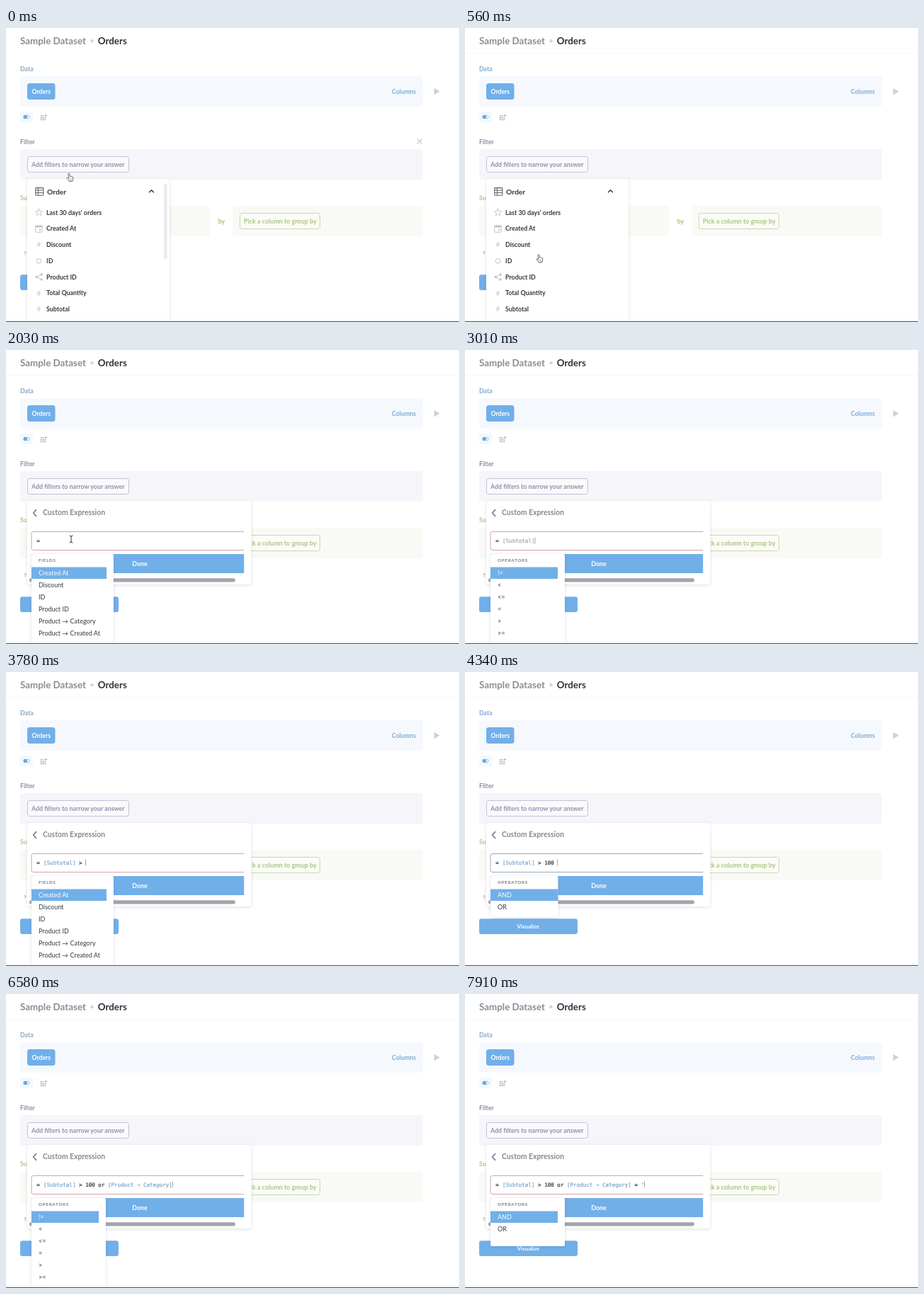
These frames come from a looping animation (640x415 px, 8000 ms). An HTML page:

```html
<!DOCTYPE html>
<html lang="en">
<head>
<meta charset="utf-8">
<title>Custom expression filter</title>
<style>
html, body { margin: 0; width: 100%; height: 100%; overflow: hidden; background: #fff; }
svg { display: block; width: 100vw; height: 100vh; }
text { font-family: Lato, "Open Sans", sans-serif; }
text.code { font-family: "DejaVu Sans Mono", "Noto Sans Mono", monospace; }
.shadow { filter: drop-shadow(0 1px 2px rgba(40, 50, 70, .16)); }
</style>
</head>
<body>
<svg id="stage" viewBox="0 0 640 415" xmlns="http://www.w3.org/2000/svg">
  <defs><clipPath id="menuClip"><rect x="30" y="213" width="201" height="201"/></clipPath></defs>
  <g id="page"></g>
  <g id="live"></g>
  <rect y="414" width="640" height="1" fill="#008700"/>
</svg>
<script>
const LOOP = 8000, STEP = 70;
const BLUE = '#71afe9', DARK = '#343a40', ICON = '#c0c3c9';
const CHAR = 4.55, CODE_X = 53;

// ---- drawing helpers ----
const esc = s => s.replace(/&/g, '&amp;').replace(/</g, '&lt;').replace(/>/g, '&gt;');
const rect = (x, y, w, h, fill, r = 0, extra = '') =>
  `<rect x="${x}" y="${y}" width="${w}" height="${h}" rx="${r}" fill="${fill}" ${extra}/>`;
const line = (d, color, w = 1, fill = 'none') =>
  `<path d="${d}" fill="${fill}" stroke="${color}" stroke-width="${w}" stroke-linecap="round" stroke-linejoin="round"/>`;
const label = (x, cy, size, fill, str, weight = 700, extra = '') =>
  `<text x="${x}" y="${cy + size * 0.35}" font-size="${size}" font-weight="${weight}" fill="${fill}" ${extra}>${str}</text>`;
const middle = 'text-anchor="middle"';
const dot = (x, y, r, fill) => `<circle cx="${x}" cy="${y}" r="${r}" fill="${fill}"/>`;
const clamp = v => Math.max(0, Math.min(1, v));
const ease = (t, a, b) => { const k = clamp((t - a) / (b - a)); return k * k * (3 - 2 * k); };
const mix = (a, b, k) => a + (b - a) * k;

function share(x, y, c) {
  return line(`M${x + 3.6} ${y - 3.5}L${x - 3.3} ${y}L${x + 3.6} ${y + 3.5}`, c, 1) +
    dot(x + 3.6, y - 3.5, 1.7, c) + dot(x - 3.3, y, 1.8, c) + dot(x + 3.6, y + 3.5, 1.7, c);
}

function drawPage() {
  let s = label(20, 18, 13.4, '#898e94', 'Sample Dataset') + dot(121.5, 18.3, 2.3, '#d3d6da') +
    label(129.8, 18, 13.35, '#2e353b', 'Orders');

  s += label(20, 57.5, 8.8, '#86a9cb', 'Data') + rect(20, 68, 569, 43, '#f5f9fe', 4) +
    rect(30, 78, 39.5, 23, BLUE, 3.5) + label(49.8, 89.5, 8.7, '#fff', 'Orders', 700, middle) +
    label(545, 89.5, 8.8, '#7dabd6', 'Columns') +
    '<path d="M604.8 85L613 89.6L604.8 94.4Z" fill="#cfd1d5"/>';

  s += rect(20, 118, 18, 15, '#f4f8fd', 3) +
    '<circle cx="30.6" cy="125.5" r="2.4" fill="none" stroke="#8fbde8" stroke-width=".9"/>' +
    dot(27.3, 125.5, 2.8, '#69a7e2');
  for (let i = 0; i < 9; i++)
    if (i !== 2) s += rect(48.8 + i % 3 * 2.8, 123.2 + Math.floor(i / 3) * 2.7, 1.8, 1.6, '#a3a7ae');
  s += line('M55 123.4h2.8M56.4 122v2.8', '#a3a7ae', 0.8);

  s += label(20, 160.5, 8.8, '#8d8fa2', 'Filter') + rect(20, 171, 569, 43, '#f6f5fa', 4) +
    rect(30.5, 181.5, 143, 22, '#faf9fc', 3, 'stroke="#c2c2d7"') +
    label(36, 193, 8.85, '#9192ab', 'Add filters to narrow your answer');

  s += label(20, 240, 8.8, '#b3c58e', 'Summarize') +
    rect(20, 251, 268, 43, '#f9faf5', 4) + rect(320, 251, 269, 43, '#f9faf5', 4) +
    label(304.5, 272.5, 8.8, '#abc482', 'by', 700, middle) +
    rect(330.5, 261.5, 113, 22, '#fbfcf8', 3, 'stroke="#c6d9ae"') +
    label(336, 272.5, 8.95, '#abc482', 'Pick a column to group by');

  s += line('M27.2 320v-4.6m-1.6 1.5l1.6-1.6l1.6 1.6', '#a8acb3', 0.8) +
    rect(20, 348.3, 139, 21.7, BLUE, 3) + label(89.2, 359, 8, '#fff', 'Visualize', 700, middle);
  return s;
}

// ---- column menu ----
const COLUMNS = [
  ['star', "Last 30 days' orders"], ['cal', 'Created At'], ['#', 'Discount'], ['id', 'ID'],
  ['share', 'Product ID'], ['#', 'Total Quantity'], ['#', 'Subtotal'], ['#', 'Tax'],
  ['#', 'Total'], ['share', 'User ID']
];

function star(x, y) {
  let d = '';
  for (let i = 0; i < 10; i++) {
    const r = i % 2 ? 2.3 : 5.2, a = Math.PI * (i / 5 - 0.5);
    d += `${i ? 'L' : 'M'}${(x + r * Math.cos(a)).toFixed(2)} ${(y + r * Math.sin(a)).toFixed(2)}`;
  }
  return line(d + 'Z', ICON, 0.9);
}

const icons = {
  star,
  cal: (x, y) => rect(x - 4.8, y - 4, 9.6, 9, 'none', 1, `stroke="${ICON}"`) +
    rect(x - 4.8, y - 4, 9.6, 2.2, ICON) + line(`M${x - 2.5} ${y - 5.4}v1.5m5-1.5v1.5`, ICON) +
    rect(x + 0.6, y + 1, 2.2, 2, ICON),
  '#': (x, y) => label(x, y, 9.5, ICON, '#', 400, middle),
  id: (x, y) => `<circle cx="${x}" cy="${y}" r="3.4" fill="none" stroke="${ICON}"/>`,
  share: (x, y) => share(x, y, ICON)
};

function drawMenu(t) {
  const scroll = 166.5 * ease(t, 650, 1200);
  let s = rect(41.8, 225.6, 11, 10.6, 'none', 0.6, 'stroke="#5c636a" stroke-width="1.1"') +
    line('M42 229h10.6M42 232.6h10.6M45.4 226v10', '#5c636a', 1) +
    label(58, 231, 10.3, DARK, 'Order') + line('M202.5 231.8l3-3l3 3', DARK, 1.5);
  COLUMNS.forEach(([icon, name], i) => {
    const y = 260.4 + i * 22.79;
    s += icons[icon](46.5, y) + label(57, y, 8.9, DARK, name);
  });
  [['Product', 498.2], ['User', 533]].forEach(([name, y]) => {
    s += share(47.3, y, DARK) + label(58, y, 10.35, DARK, name) +
      line(`M202.5 ${y - 1.5}l3 3l3-3`, DARK, 1.5);
  });
  s += line('M42.2 564.8h9.6M44.2 568h5.6M45.6 571.2h2.8', '#8083a0', 1.7) +
    label(57, 568, 10.3, '#8788a5', 'Custom Expression');

  const shown = t < 600 ? 0.22 * (1 - ease(t, 70, 420)) : ease(t, 600, 760);
  return `<g class="shadow">${rect(30, 213, 201, 214, '#fff', 4)}</g>
    <g clip-path="url(#menuClip)"><g transform="translate(0 ${-scroll})">${s}</g></g>` +
    rect(223.3, 219 + scroll * 0.53, 4.2, 107, '#989ca6', 2.1, `opacity="${shown}"`);
}

// ---- expression editor ----
const FIELDS = ['Created At', 'Discount', 'ID', 'Product ID', 'Product → Category', 'Product → Created At'];
const PRO = ['Product ID', 'Product → Category', 'Product → Created At', 'Product → Ean', 'Product → ID', 'Product → Price'];
const OPS = ['!=', '<', '<=', '=', '>', '>='];
const list = (title, rows, right, mark, bottom) => ({ title, rows, right, mark, bottom });
const lists = {
  fields: list('FIELDS', FIELDS, 152, 142, 426),
  pro: list('FIELDS', PRO, 153, 143, 426),
  sub: list('FIELDS', ['Subtotal'], 131.5, 131.5, 329),
  ops: list('OPERATORS', OPS, 141, 131, 426),
  logic: list('OPERATORS', ['AND', 'OR'], 131.5, 131.5, 346),
  or: list('OPERATORS', ['OR'], 131.5, 131.5, 329),
  logicWide: list('OPERATORS', ['AND', 'OR'], 141, 131, 356)
};

// time, text, list, last word still plain, matched letters, marked row
const SUB = '[Subtotal]', CAT = SUB + ' > 100 or [Product → Category]';
const STATES = [
  [1470, '', null],
  [1610, '', 'fields'],
  [2380, 's', 'fields', 1],
  [2520, 'su', 'sub', 1, 2],
  [2590, 'sub', 'sub', 1, 3],
  [3010, SUB, 'ops', 1],
  [3080, SUB, 'ops'],
  [3220, SUB + ' ', 'ops'],
  [3430, SUB + ' >', 'ops'],
  [3570, SUB + ' >', 'fields'],
  [3780, SUB + ' > ', 'fields'],
  [3920, SUB + ' > 1', null],
  [3990, SUB + ' > 10', null],
  [4060, SUB + ' > 100', null],
  [4200, SUB + ' > 100 ', 'logic'],
  [4690, SUB + ' > 100 o', 'or', 1, 1],
  [4830, SUB + ' > 100 or', 'or', 0, 2],
  [4970, SUB + ' > 100 or ', 'fields'],
  [5110, SUB + ' > 100 or p', 'pro', 1, 1],
  [5250, SUB + ' > 100 or pr', 'pro', 1, 2],
  [5390, SUB + ' > 100 or pro', 'pro', 1, 3],
  [6090, SUB + ' > 100 or pro', 'pro', 1, 3, 1],
  [6440, CAT, 'ops', 1],
  [6510, CAT, 'ops'],
  [7000, CAT + ' ', 'ops'],
  [7490, CAT + ' =', 'fields'],
  [7630, CAT + ' = ', 'fields'],
  [7840, CAT + ' = "', 'logicWide']
];

const codeText = (x, str, fill) =>
  `<text class="code" x="${x}" y="271.8" font-size="7.56" fill="${fill}" stroke="${fill}" stroke-width=".2">${esc(str)}</text>`;

function drawCode(text, plainEnd) {
  const words = [...text.matchAll(/\[.*?\]|\S+/g)];
  return codeText(43.2, '=', '#2e353b') + words.map((m, i) => {
    const plain = plainEnd && i === words.length - 1;
    const color = plain ? '#a0a3a8' : m[0][0] === '[' ? '#76a3cc' : m[0] === '"' ? '#d8b765' : '#2a2f35';
    return codeText(CODE_X + m.index * CHAR, m[0], color);
  }).join('');
}

function drawRow(name, y, marked, match) {
  const [head, tail] = name.split(' → ');
  const color = marked ? '#fff' : DARK;
  let str = esc(head);
  if (match) {
    const style = marked ? 'font-weight="700"' : 'fill="#509ee3"';
    str = `<tspan ${style}>${head.slice(0, match)}</tspan>${head.slice(match)}`;
  }
  return label(46, y, 9, color, str, 400) +
    (tail ? label(79, y, 9, color, '→', 400) + label(90.6, y, 9, color, tail, 400) : '');
}

function drawList({ title, rows, right, mark, bottom }, match, marked) {
  return `<g class="shadow">${rect(36, 288, right - 36, bottom - 288, '#fff', 2)}</g>` +
    label(46, 297, 6.2, '#737981', title, 700, 'letter-spacing=".75"') +
    rect(36, 306.5 + marked * 17, mark - 36, 16.5, BLUE) +
    rows.map((name, i) => drawRow(name, 315 + i * 17, i === marked, match)).join('');
}

function drawEditor(t) {
  const [, text, name, plain, match = 0, marked = 0] = STATES.filter(s => s[0] <= t).pop();
  const valid = t >= 3920 && t < 4830;
  const caret = t >= 2310 && !(t >= 5880 && t < 6090);
  const caretX = CODE_X + text.length * CHAR + 0.1;
  return `<g class="shadow">${rect(30, 213, 316.5, 118, '#fff', 4)}</g>` +
    line('M42.6 225.6l-4 4.4l4 4.4', '#7d8289', 1.8) +
    label(52, 229.6, 10.35, '#85898f', 'Custom Expression') +
    line('M336 256.5H38.5Q36 256.5 36 259V280Q36 282.5 38.5 282.5H336', valid ? '#93abc6' : '#d3a3ae', 1) +
    drawCode(text, plain) +
    (caret ? rect(caretX, 264.5, 0.7, 9, '#787d84') : '') +
    rect(36, 288, 300.3, 27, BLUE) + label(189, 301.5, 8.9, '#fff', 'Done', 700, middle) +
    rect(33, 322.2, 291, 5.2, '#a1a4ad', 2.6) +
    (name ? drawList(lists[name], match, marked) : '');
}

// ---- pointer ----
function drawPointer(t) {
  if (t >= 2310) return '';
  if (t >= 1680) {
    const k = ease(t, 1540, 1960), x = mix(112, 92, k), y = mix(398, 267, k);
    return line(`M${x - 2} ${y - 5}q2 0 2 1.5v7q0 1.5-2 1.5m4-10q-2 0-2 1.5m0 7q0 1.5 2 1.5`, '#33383d', 1);
  }
  const a = ease(t, 0, 560), b = ease(t, 1050, 1400), c = ease(t, 1540, 1960);
  const x = mix(mix(mix(86, 101, a), 107, b), 92, c);
  const y = mix(mix(mix(205.5, 320, a), 394.5, b), 267, c);
  return `<g transform="translate(${x} ${y})">` +
    line('M2 .8Q2-.2 2.9-.2Q3.8-.2 3.9.8L4.4 4Q5.4 3.2 6 4.2Q7 3.6 7.4 4.7Q8.6 4.4 8.7 5.6Q8.9 8 7.8 11H3.2Q2.5 9.2.4 7Q-.3 6 .6 5.6Q1.4 5.4 2.6 6.5Z', '#40444a', 0.8, '#fff') +
    line('M4.6 7.4v2M6.2 7.4v2', '#40444a', 0.5) + '</g>';
}

// The header gains a hairline and the filter's close mark fades once the pointer moves on.
function drawHover(t) {
  const close = 1 - ease(t, 0, 280);
  return (t >= 70 ? rect(0, 35.5, 640, 0.8, '#f2f3f4') : '') +
    (close ? `<g opacity="${close}">${line('M581.2 157.2l6 6m0-6l-6 6', '#b9bcc2', 1.2)}</g>` : '');
}

const live = document.getElementById('live');
document.getElementById('page').innerHTML = drawPage();
let last = -1;

function frame() {
  const t = Math.floor(performance.now() % LOOP / STEP) * STEP;
  if (t !== last) {
    last = t;
    live.innerHTML = drawHover(t) + (t < 1470 ? drawMenu(t) : drawEditor(t)) + drawPointer(t);
  }
  requestAnimationFrame(frame);
}
frame();
</script>
</body>
</html>
```
